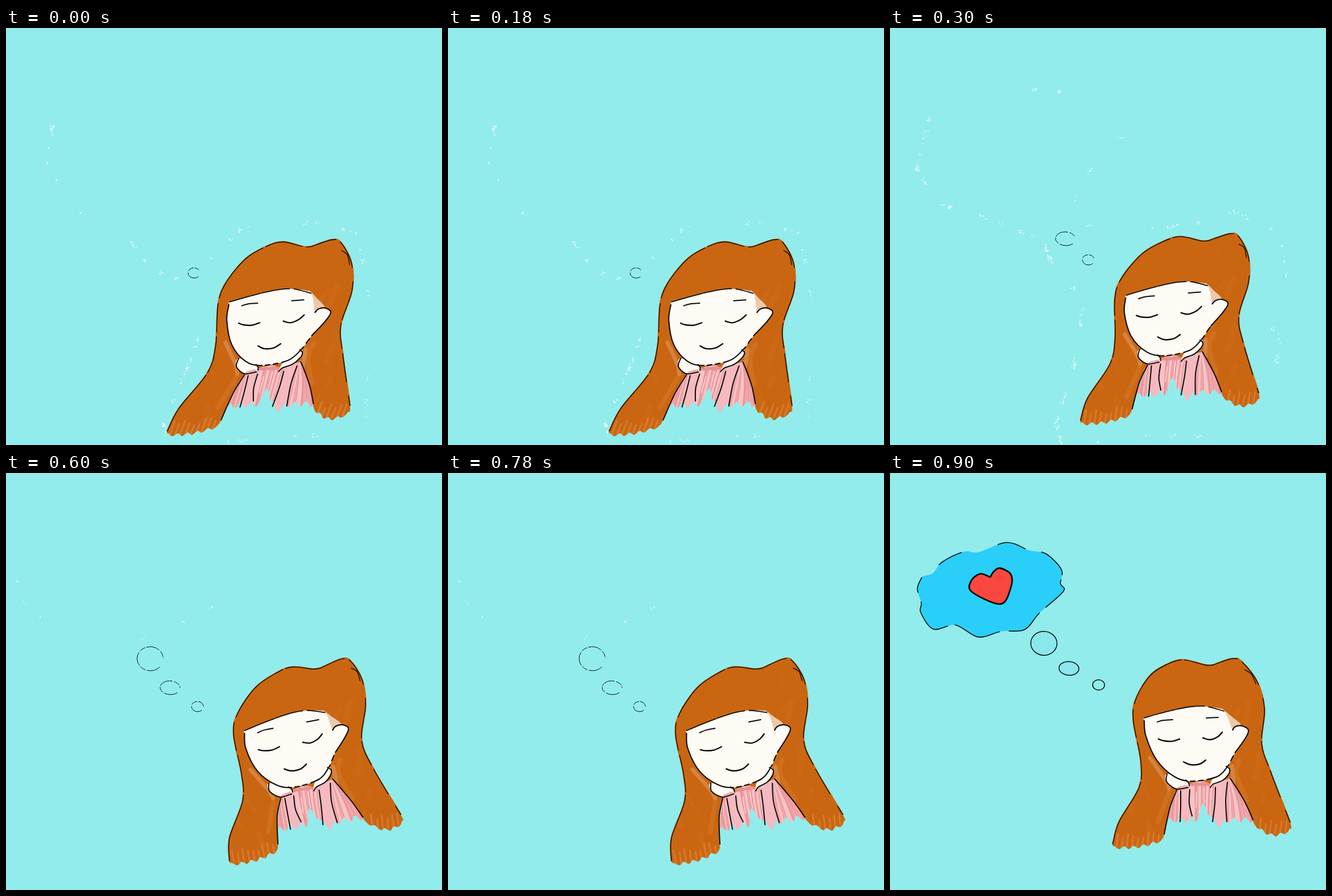
Animation, 765 px wide and 732 px high, one loop 1200 ms. Source, as an HTML page with a canvas:

```html
<!DOCTYPE html>
<html lang="en">
<head>
<meta charset="utf-8">
<title>Daydream</title>
<style>
html, body { margin: 0; width: 100%; height: 100%; overflow: hidden; background: #92eceb; }
canvas { display: block; }
</style>
</head>
<body>
<canvas id="stage" width="765" height="732"></canvas>
<script>
const ctx = document.getElementById('stage').getContext('2d');
const STEP = 300;
const SKY = '#92eceb', INK = '#0b0b0b', HAIR = '#ca6611', SKIN = '#fefbf5';

let seed = 1;
const rnd = () => (seed = seed * 16807 % 2147483647) / 2147483647;
const between = (a, b) => a + (b - a) * rnd();
const lerp = (a, b, t) => a + (b - a) * t;
const points = text => text.trim().split(/\s+/).map(p => p.split(',').map(Number));

// Each pose leans the girl: shift, shear and bend in x, shift and tilts in y.
const poses = [
  { shift: -66, shear: -24.5, bend: 0, drop: 50, tilt: -2, stretch: 2 },
  { shift: -41, shear: -16.9, bend: 4.6, drop: 35, tilt: -3.5, stretch: -1.5 },
  { shift: -28, shear: 2.7, bend: 8.4, drop: 9, tilt: -14, stretch: 0 },
  { shift: 0, shear: 0, bend: 0, drop: 0, tilt: 0, stretch: 0 }
];
let pose = poses[3];

function lean([x, y]) {
  const u = (x - 540) / 100, v = (y - 480) / 100;
  return [x + pose.shift + pose.shear * v + pose.bend * v * v,
          y + pose.drop + pose.tilt * u + pose.stretch * v];
}

// Smooth curve through the points.
function curve(list, closed = false) {
  const p = list.map(lean), n = p.length, path = new Path2D();
  const at = i => closed ? p[(i + n) % n] : p[Math.max(0, Math.min(n - 1, i))];
  path.moveTo(...p[0]);
  for (let i = 0; i < (closed ? n : n - 1); i++) {
    const [o, s, e, f] = [at(i - 1), at(i), at(i + 1), at(i + 2)];
    path.bezierCurveTo(s[0] + (e[0] - o[0]) / 6, s[1] + (e[1] - o[1]) / 6,
      e[0] - (f[0] - s[0]) / 6, e[1] - (f[1] - s[1]) / 6, ...e);
  }
  return path;
}

function fill(list, color) {
  ctx.fillStyle = color;
  ctx.fill(curve(list, true));
}

function stroke(list, width, color = INK, dash = []) {
  ctx.strokeStyle = color;
  ctx.lineWidth = width;
  ctx.setLineDash(dash);
  ctx.stroke(curve(list));
  ctx.setLineDash([]);
}

function strokes(text, width, color) {
  text.split('/').forEach(part => stroke(points(part), width, color));
}

function within(list, paint) {
  ctx.save();
  ctx.clip(curve(list, true));
  paint();
  ctx.restore();
}

// Brushed lower edge between two points: a sag with regular teeth.
const brushed = ([x1, y1], [x2, y2], sag, teeth) =>
  Array.from({ length: teeth * 2 + 1 }, (_, i) => {
    const t = i / (teeth * 2);
    return [lerp(x1, x2, t), lerp(y1, y2, t) + sag * Math.sin(Math.PI * t) + (i % 2) * 5];
  });

const crown = points('391,651 402,612 437,552 440,505 427,435 431,398 456,356 488,335 515,328 553,337 567,337');
const bun = points('567,337 600,326 618,332 645,368 657,415 652,475 668,525 702,613');
const collar = points('503,556 525,546 548,541 564,545 597,536');
const sleeveL = points('503,557 491,588 481,634');
const sleeveR = points('597,536 610,556 624,580 637,609');
const hair = [...crown, ...bun, ...brushed([701, 625], [637, 612], 14, 4),
  ...sleeveR.slice().reverse(), ...collar.slice().reverse(), ...sleeveL,
  ...brushed([478, 642], [394, 655], 5, 5)];

const hem = [];
for (let x = 637; x >= 484; x -= 5) {
  const bump = c => Math.exp(-(((x - c) / 9) ** 2));
  hem.push([x, 609 + 5 * Math.sin(x * 0.33) - 26 * bump(551) + 9 * bump(579)]);
}
const sweater = [...sleeveL.slice(0, 2), ...collar, ...sleeveR, ...hem];

const fringe = points('446,430 470,423 502,415 530,410 556,410 586,418');
const ear = points('601,451 606,445 618,444 629,452 622,468 606,490');
const jaw = points('446,435 449,462 468,504 499,533 530,541 574,533 593,514 600,501 606,490');
const face = [...fringe, ...ear, ...jaw.slice().reverse()];
const handL = points('486,528 485,541 495,551 505,555 523,552');
const handR = points('590,515 596,520 594,529 583,540 567,546 562,552');

function drawHair() {
  fill(hair, HAIR);
  stroke([...crown, ...bun], 3, HAIR);
  within(hair, () => {
    for (let i = 0; i < 40; i++) {
      const x = between(400, 680), y = between(335, 620), lie = between(-12, 12);
      stroke([[x, y], [x + lie, y + 22], [x + lie * 2, y + 40]], between(5, 12),
        i % 2 ? '#d9772324' : '#c05e0c24');
    }
    const tips = (from, to, y) => {
      for (let x = from; x < to; x += 9) strokes(`${x},${y + 6} ${x + 3},${y - between(8, 22)}`, 3, '#e5985e66');
    };
    tips(397, 482, 652);
    tips(648, 700, 627);
    strokes('456,500 484,540 490,555 / 600,515 603,545', 7, '#e0975f99');
    strokes('489,562 470,612 / 612,505 608,530 626,575', 8, '#dc843b55');
    fill(points('580,413 600,428 616,443 601,452 592,440'), '#ebc9ab');
  });
}

function drawSweater() {
  fill(sweater, '#f4babf');
  within(sweater, () => {
    // Ribbed panels: left and right edge at the collar, then at the hem.
    for (const [a, b, c, d] of [[500, 508, 480, 507], [529, 569, 532, 564], [595, 602, 593, 640]]) {
      for (let t = 0; t <= 1; t += 0.09) {
        const top = lerp(a, b, t), low = lerp(c, d, t);
        stroke([[top, 538], [lerp(top, low, 0.6), 575], [low, 622]], between(2, 5),
          ['#ea959a', '#efa3a8', '#f6c4c6'][Math.floor(rnd() * 3)]);
      }
    }
    strokes('538,560 537,588 / 551,552 551,580', 1.2, '#fdeae8');
    strokes('524,547 566,546', 5, '#e98e90');
  });
}

function drawFace() {
  fill(handL.concat([[520, 539]]), SKIN);
  fill(handR.concat([[566, 537]]), SKIN);
  strokes('507,553 520,550', 5, '#f1aaac');
  fill(face, SKIN);
  stroke(jaw, 2.1, INK, [140, 6, 8, 6, 8, 7, 48, 8, 10, 6, 30]);
  stroke(ear, 2.1);
  stroke(handL, 2);
  stroke(handR, 2);
  strokes('519,539 524,544 525,549', 2);
  stroke(fringe, 1.8, INK, [56, 2, 50, 8]);
  // Closed eyes and smile, then brows
  strokes('471,467 480,470 495,471 508,467 / 549,465 562,468 575,463 583,455 / 515,507 527,512 543,511 554,504', 2.4);
  strokes('469,437 480,434 496,433 / 555,430 576,429', 2);
}

function drawGirl() {
  seed = 7;
  drawHair();
  drawSweater();
  drawFace();
  strokes('510,558 510,585 509,612 / 526,556 525,580 530,602 / 571,552 570,580 566,612 / 592,543 589,575 591,612', 2);
  stroke(sleeveL, 2);
  stroke(sleeveR, 2);
  stroke(crown, 1.4, INK, [120, 5, 66, 8, 50, 10]);
  stroke(bun, 1.4, INK, [45, 9, 50, 25, 70, 6]);
  strokes('622,345 634,353 642,370', 1.4);
}

// White specks in small clumps along loose trails: count, then key points.
const trails = [[
  [34, '82,168 70,250 137,331'], [30, '210,362 255,425 306,442'],
  [75, '350,508 326,580 276,695 284,716'], [70, '352,413 418,348 555,341 618,362 640,490 632,685'],
  [20, '600,711 465,720 385,725']
], [
  [50, '70,155 47,245 65,278'], [40, '90,311 150,325 262,372'], [50, '269,375 285,415 322,458'],
  [22, '247,109 300,112 327,132'], [14, '411,185 355,243 322,312'],
  [60, '332,345 480,350 560,340 602,322 683,358 696,435'], [22, '667,528 685,530 678,588'],
  [80, '338,490 320,610 291,690 300,728'], [20, '340,731 440,715 592,716']
], [
  [10, '20,188 20,215 66,255'], [10, '187,306 270,281 366,234']
], []];

function drawSpecks(index) {
  seed = 41 + index;
  ctx.fillStyle = '#fff';
  for (const [count, text] of trails[index]) {
    const key = points(text);
    let at = 0;
    for (let i = 0; i < count; i++) {
      if (i % 4 === 0) at = rnd() * (key.length - 1.05);
      const spot = Math.min(at + rnd() * 0.08, key.length - 1.01), j = Math.floor(spot);
      const place = c => lerp(key[j][c], key[j + 1][c], spot - j) + between(-3, 3);
      ctx.beginPath();
      ctx.ellipse(place(0), place(1), between(0.4, 0.9), between(0.6, 1.5), rnd() * 3, 0, 7);
      ctx.fill();
    }
  }
}

// Thought bubbles, smallest first.
const bubbles = ['330,430', '348,407 308,370', '336,410 288,377 253,326', '366,372 314,343 270,299'];
const radii = points('10.5,9 17.5,12 23,21');

function drawBubbles(index) {
  const done = index === 3;
  ctx.strokeStyle = INK;
  ctx.lineWidth = done ? 1.5 : 1;
  ctx.setLineDash(done ? [] : [24, 3, 11, 2]);
  points(bubbles[index]).forEach(([x, y], i) => {
    ctx.beginPath();
    ctx.ellipse(x, y, ...radii[i], 0.06, 0.7, done ? 7 : 5.6 + index * 0.3);
    ctx.fillStyle = done && i ? '#8ae7ec' : SKY;
    ctx.fill();
    ctx.stroke();
  });
  ctx.setLineDash([]);
}

const cloud = points(`75,176 92,156 130,138 155,139 205,122 245,136 274,142 301,170 299,194 304,208
  262,246 236,275 195,278 155,288 115,267 76,274 54,245 55,228 48,203 56,183`);
const heart = points('176,183 158,177 142,190 144,209 194,230 212,201 212,178 193,167 182,173 176,183');

function drawCloud() {
  fill(cloud, '#29cff9');
  stroke(cloud, 1.6, INK, [0, 18, 46, 66, 52, 28, 58, 8, 66, 14, 68, 16, 86, 12, 84, 16, 34, 40]);
  ctx.fillStyle = '#f9483f';
  ctx.fill(curve(heart));
  strokes('155,203 172,216 188,212 / 186,186 199,182', 7, '#ec3f3a55');
  stroke(heart, 2.8);
}

function draw(index) {
  ctx.fillStyle = SKY;
  ctx.fillRect(0, 0, 765, 732);
  ctx.lineCap = 'butt';
  ctx.lineJoin = 'round';
  drawSpecks(index);
  drawBubbles(index);
  pose = poses[index];
  if (index === 3) drawCloud();
  ctx.lineCap = 'round';
  drawGirl();
}

let shown = -1;
function tick() {
  const index = Math.floor(performance.now() / STEP) % poses.length;
  if (index !== shown) draw(shown = index);
  requestAnimationFrame(tick);
}
tick();
</script>
</body>
</html>
```
